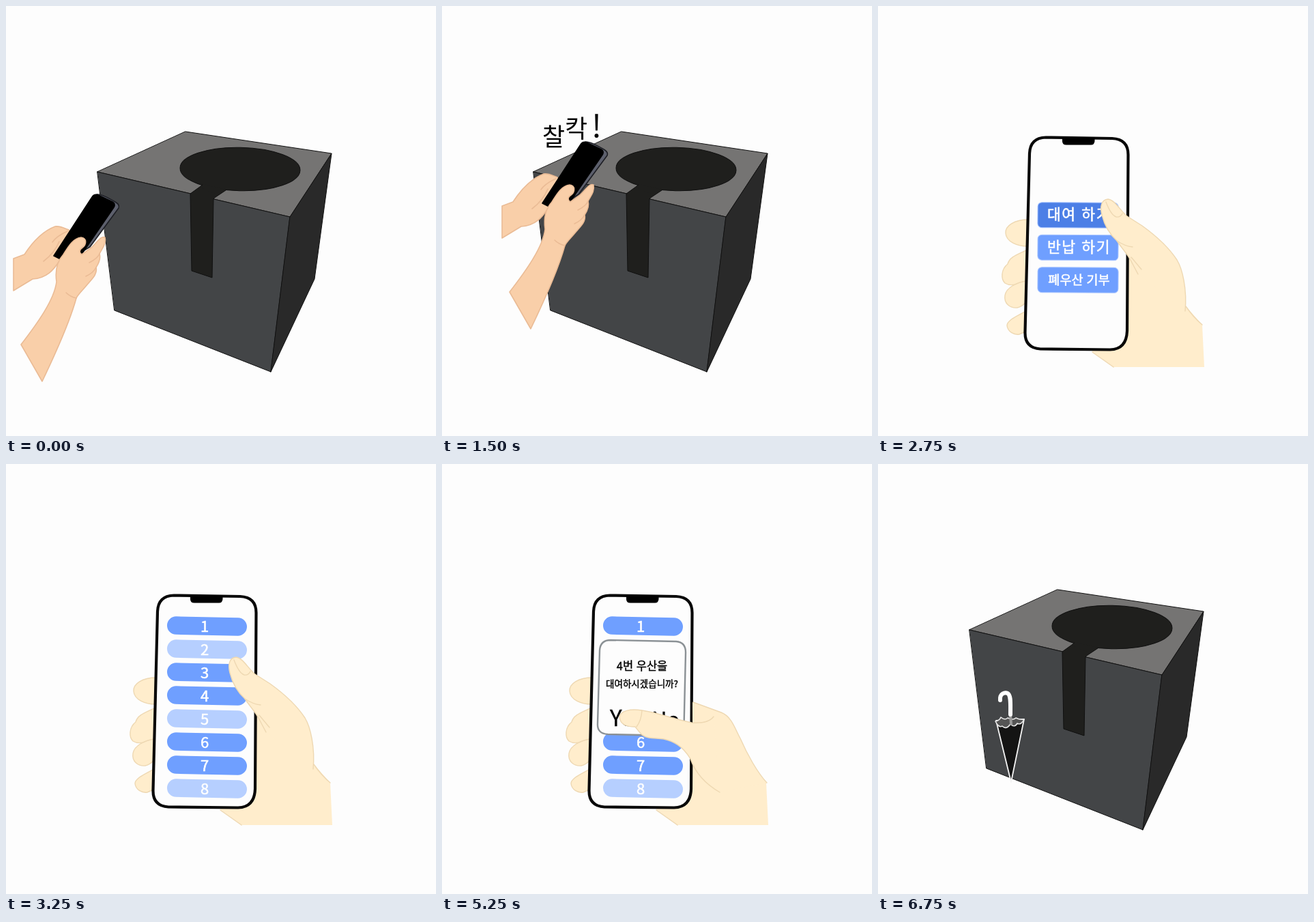
Animation of 630x630 px, one loop 7000 ms. Source, as an HTML page:

```html
<!DOCTYPE html>
<html lang="ko">
<head>
<meta charset="utf-8">
<style>
html, body { margin: 0; height: 100%; overflow: hidden; background: #fdfdfd; }
svg { display: block; width: 100vw; height: 100vh; font-family: "Noto Sans CJK KR", "Noto Sans CJK", sans-serif; }
path { stroke-linejoin: round; stroke-linecap: round; }
.cube path, .cube ellipse { stroke: #101010; stroke-width: 1; }
.skin path { fill: #f9cfa9; stroke: #eabb95; stroke-width: 1.6; }
.palm path { fill: #ffedcc; stroke: #eed8b2; stroke-width: 1.4; }
.skin .line, .palm .line { fill: none; }
.palm .fill { stroke: none; }
.label { fill: #fff; stroke: #fff; stroke-width: .6; text-anchor: middle; }
#popup text { stroke: #000; stroke-width: .4; }
</style>
</head>
<body>
<svg viewBox="0 0 630 630">
  <defs><clipPath id="rim"><rect width="630" height="271"/></clipPath></defs>

  <g id="station">
    <g class="cube">
      <path fill="#757473" d="M263 184L477 216 416 309 134 243Z"/>
      <path fill="#434547" d="M134 243L416 309 388 536 159 446Z"/>
      <path fill="#292929" d="M416 309L477 216 452 400 388 536Z"/>
      <ellipse fill="#1f1f1d" cx="343" cy="239" rx="88" ry="31.8" transform="rotate(1.2 343 239)"/>
      <path fill="#1f1f1d" d="M288 262L270 275 272 388 302 398 304 282 322 270"/>
      <path fill="#1f1f1d" style="stroke:none" d="M289 261L322 269 310 277 285 266Z"/>
    </g>

    <g id="scanner" class="skin">
      <path d="M11 370L27 364C40 344 56 329 72 323 80 322 86 326 92 328L104 350 78 374C70 386 60 399 39 400L11 417Z"/>
      <path class="line" d="M90 330Q74 337 68 346M78 345Q71 362 55 374"/>
      <path d="M133 276Q140 275 160 287 167 291 165 296L123 353 106 363 120 320Z" style="fill:#5d606d;stroke:#1d1e24"/>
      <path d="M126 280Q129 275 135 277L156 287Q161 290 158 295L112 362 80 371 70 366Z" style="fill:#000;stroke:#000"/>
      <path d="M53 550L22 496C46 465 71 430 74 404 72 390 74 375 84 364 92 351 99 340 110 339 119 340 118 350 112 354 106 358 108 362 111 364L125 354C134 346 139 336 145 339 147 350 140 356 137 363 139 370 136 377 132 383 134 392 128 398 120 407 112 417 105 423 103 428 94 461 76 502 53 550Z"/>
      <path class="line" d="M137 363Q134 370 122 376M132 383Q128 391 117 396M103 428Q94 426 88 420"/>
    </g>

    <g id="click" font-size="36" font-weight="500">
      <text x="147" y="205">찰</text>
      <text x="180" y="193">칵</text>
      <text x="219" y="193" font-size="46">!</text>
    </g>

    <g id="rimBox"><g id="umbrella">
      <path d="M173 376L195 466 214 374Z" fill="#141414" stroke="#f4f4f4" stroke-width="1.8"/>
      <path d="M172 377q6-1 8-6 6 5 10 1 8 4 12 0 6 3 12 2-4 9-10 6-4 7-10 1-6 9-12 3-5 3-10-7Z" fill="#555" stroke="#e8e8e8" stroke-width="1.6"/>
      <path d="M194 367L195 381" stroke="#999" stroke-width="4"/>
      <path d="M179 346C178 336 186 334 190 336 195 339 194 350 194 367" fill="none" stroke="#fff" stroke-width="6"/>
    </g></g>
  </g>

  <g id="app">
    <g class="palm">
      <path d="M220 313C200 313 186 322 187 333 188 346 205 352 219 352"/>
      <path d="M219 357C205 364 193 367 190 378 180 386 180 400 186 406 197 413 212 405 218 402"/>
      <path d="M217 403C204 405 188 412 186 424 184 437 195 443 204 442 210 441 214 437 217 434"/>
      <path d="M216 447C206 454 190 459 189 468 190 478 200 482 207 481L216 477"/>
      <path class="fill" d="M314 506L345 529H478L475 467 452 441 400 380 367 348 340 400Z"/>
      <path class="line" d="M314 507L345 529M451 440Q462 456 475 467"/>
    </g>
    <path d="M246 192.5L343 194Q367 195 366.5 219L365 476Q364 503 340 503.5L238 502.5Q215 501 215.5 478L222 216Q223 193 246 192.5Z" fill="#fdfdfd" stroke="#080808" stroke-width="4.2"/>
    <path d="M270 193H317.500V198Q317 203.500 312 203.500H276Q270 203.500 270 198Z"/>
    <g id="menu"></g>
    <g id="list"></g>

    <g id="popup" text-anchor="middle">
      <path d="M247 258L343 260Q357 261 357 276L354.500 384Q353 398 338 398L243 396Q227 395 228 380L231 273Q232 258 247 258Z" fill="#fdfdfd" stroke="#8b9195" stroke-width="2.4"/>
      <text x="293" y="302" font-size="16.5">4번 우산을</text>
      <text x="293" y="327" font-size="13.5">대여하시겠습니까?</text>
      <text id="yes" x="246" y="384" font-size="33" text-anchor="start">Yes</text>
      <text x="307" y="386" font-size="31" text-anchor="start">No</text>
    </g>

    <g class="palm">
      <g id="thumbUp">
        <path class="fill" d="M450 447C453 415 446 385 438 368 428 350 420 340 416 320 411 303 404 295 397 285 396 270 390 255 379 254 368 255 364 270 364 280 365 300 374 318 384 328L391 380Z"/>
        <path class="line" d="M450 447C453 415 446 385 438 368 428 350 420 340 416 320 411 303 404 295 397 285 396 270 390 255 379 254 368 255 364 270 364 280 365 300 374 318 384 328M380 324Q384 354 391 380M368 348L385 361"/>
      </g>
      <g id="thumbPress">
        <path d="M450 447C453 415 446 385 438 372 425 352 405 335 387 322L365 308C355 300 347 284 337 283 327 284 325 294 328 306 332 322 340 335 350 344 358 356 366 364 371 374L381 393"/>
        <path class="line" d="M350 344Q362 352 373 353M371 368L386 386M334 287Q341 306 349 309 355 310 358 304"/>
      </g>
      <g id="thumbLow">
        <path class="fill" d="M367 349L409 364C425 370 430 390 437 402 447 425 462 452 476 467L407 481 367 440Z"/>
        <path class="line" d="M368 349L409 364C425 370 430 390 437 402 447 425 462 452 476 467"/>
        <g id="reach">
          <path d="M398 370C392 378 380 380 366 379 340 374 315 364 293 361 275 358 262 362 260 370 261 382 270 385 283 385 289 392 293 400 303 401 311 402 318 402 325 403 338 406 352 412 364 432 372 455 388 470 407 481"/>
          <path class="line" d="M293 361Q292 376 285 385"/>
        </g>
      </g>
    </g>
  </g>
</svg>
<script>
const $ = id => document.getElementById(id);
const BLUE = '#6f9fff', PALE = '#b6cfff', DOWN = '#4c7fe6';

$('menu').innerHTML = ['대여 하기', '반납 하기', '폐우산 기부'].map((label, i) => {
  const y = 288 + i * 47.5;
  const type = i < 2 ? 'font-size="21.5" letter-spacing="1.6"' : 'font-size="18.5"';
  return `<rect x="234" y="${y}" width="118" height="37" rx="6" fill="${BLUE}" stroke="#a9c5ff" transform="rotate(.4 293 ${y + 18})"/>
    <text class="label" x="294.5" y="${y + 25}" ${type}>${label}</text>`;
}).join('');

$('list').innerHTML = [1, 2, 3, 4, 5, 6, 7, 8].map(n => {
  const y = 203.5 + n * 34;
  return `<rect x="236" y="${y - 13.2}" width="117" height="26.5" rx="13.2" fill="${n % 3 == 2 ? PALE : BLUE}" transform="rotate(1.2 294.5 ${y})"/>
    <text class="label" x="291" y="${y + 8.5}" font-size="22" font-weight="500">${n}</text>`;
}).join('');

const rent = $('menu').querySelector('rect');
const fourth = $('list').querySelectorAll('rect')[3];
const show = (el, on) => el.style.display = on ? '' : 'none';

function draw(now) {
  const t = now % 7000;
  const within = (a, b) => t >= a && t < b;
  const app = within(1750, 5750);
  show($('app'), app);
  show($('station'), !app);

  // hands approach the station
  const near = [0, 36.5, 77][Math.min(2, Math.floor(t / 250))];
  show($('scanner'), t < 1750);
  $('scanner').setAttribute('transform', `translate(${near} ${-near})`);
  [...$('click').children].forEach((el, i) => show(el, within(1000 + i * 250, 1750)));

  // app screens
  show($('menu'), t < 3250);
  show($('list'), t >= 3250);
  show($('popup'), t >= 4750);
  rent.setAttribute('fill', t >= 2750 ? DOWN : BLUE);
  fourth.setAttribute('fill', t >= 4250 ? DOWN : BLUE);
  $('yes').setAttribute('font-weight', t >= 5250 ? 500 : 400);
  show($('thumbUp'), t < 2250);
  show($('thumbPress'), within(2250, 3750));
  show($('thumbLow'), t >= 3750);
  $('reach').setAttribute('transform', `rotate(${t < 5250 ? 20 : 0} 395 400)`);

  // umbrella slides out through the slot
  const step = Math.max(0, Math.floor((t - 5750) / 250));
  const left = 139 - [0, 37, 66, 105, 139][step];
  show($('umbrella'), t >= 5750);
  $('umbrella').setAttribute('transform', `translate(${left} ${-left})`);
  $('umbrella').setAttribute('opacity', step ? 1 : 0.75);
  $('rimBox').setAttribute('clip-path', step ? 'none' : 'url(#rim)');

  requestAnimationFrame(loop);
}
const start = performance.now();
const loop = () => draw(performance.now() - start);
loop();
</script>
</body>
</html>
```
